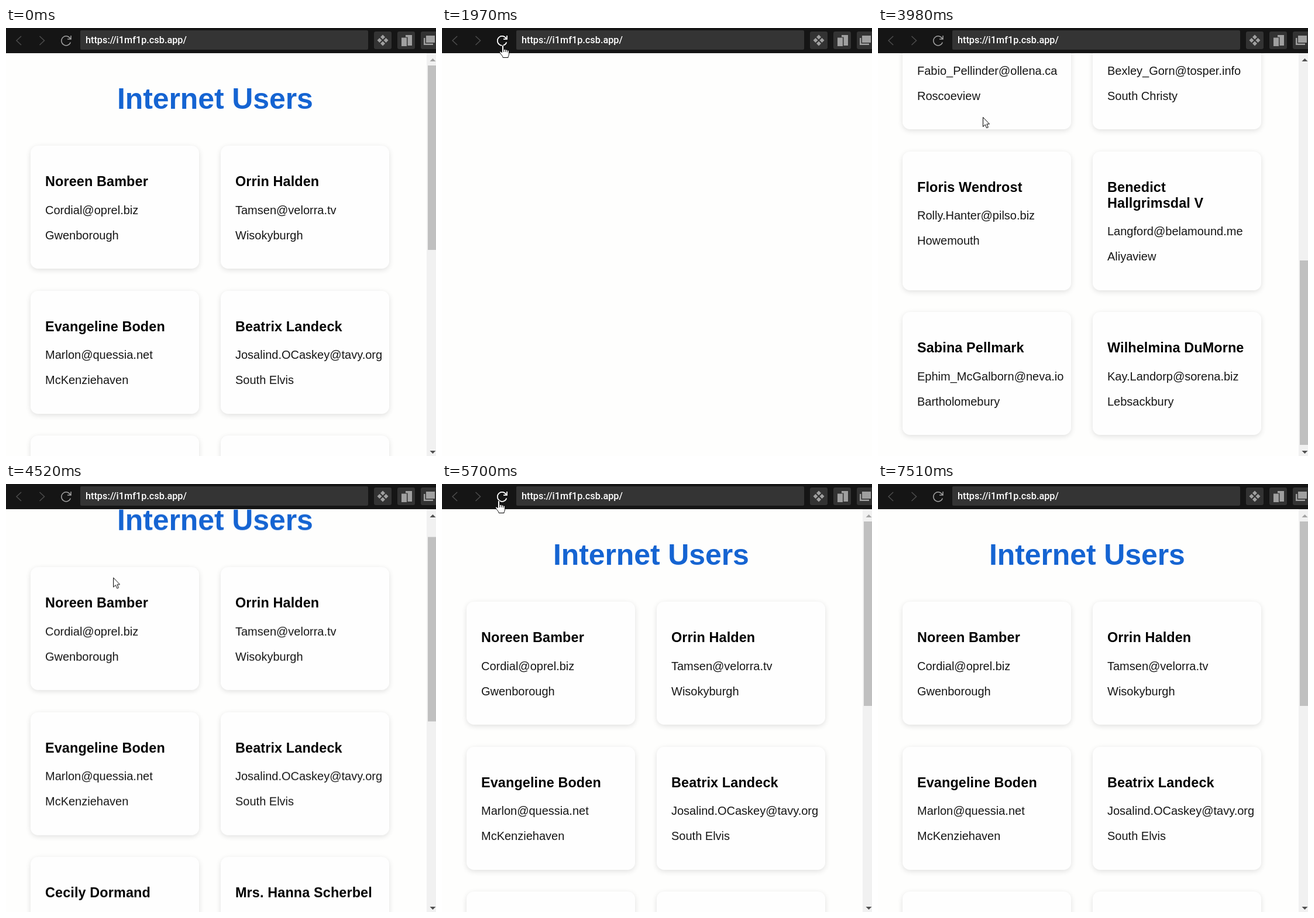
These frames come from a looping animation (735x731 px, 8000 ms). An HTML page:

```html
<!DOCTYPE html>
<html lang="en">
<head>
<meta charset="utf-8">
<title>Internet Users</title>
<style>
  html, body { margin: 0; width: 100%; height: 100%; overflow: hidden; background: #fefefd; }
  #stage { position: relative; width: 735px; height: 731px; overflow: hidden; font-family: "Liberation Sans", Arial, sans-serif; }
  #stage > *, #view > * { position: absolute; }

  /* toolbar */
  #bar { left: 0; top: 0; width: 735px; height: 43px; background: #151515; }
  #bar svg { position: absolute; left: 0; top: 0; }
  #url { position: absolute; left: 127px; top: 4px; width: 483px; height: 33px; padding-left: 9px; background: #343434; border-radius: 2px;
    color: #fff; font: 500 16.25px/33px Roboto, sans-serif; }
  .hot { animation: over 8s step-end infinite; }

  /* page */
  #view { left: 0; top: 43px; width: 735px; height: 688px; overflow: hidden; animation: load 8s step-end infinite; }
  #page { left: 0; top: 0; width: 719px; height: 1421px; animation: scroll 8s linear infinite; }
  h1 { position: absolute; left: 190px; top: 50px; margin: 0; white-space: nowrap; color: #1564d2; font-size: 50px; line-height: 57px; letter-spacing: -.1px; }
  #cards { position: absolute; left: 42px; top: 158px; display: grid; gap: 37.5px;
    grid-template-columns: 287.5px 287.5px; grid-template-rows: repeat(3, 210px) 237px 210px; }
  .card { box-sizing: border-box; padding: 48.4px 0 0 25px; border-radius: 12.5px; background: #fefefe; box-shadow: 0 2.5px 10px rgba(0, 0, 0, .12); white-space: nowrap; color: #000; }
  .card h3 { margin: 0 0 23.4px; font-size: 23.4px; line-height: 27px; letter-spacing: .13px; }
  .card p { margin: 0 0 20px; font-size: 20px; line-height: 23px; color: #161616; }

  /* scrollbar */
  #track { left: 719px; top: 0; width: 16px; height: 688px; background: #f1f1f1; }
  #thumb { left: 721px; top: 21px; width: 14px; height: 315px; background: #c0c0c0; animation: thumb 8s linear infinite; }
  #arrows { left: 719px; top: 0; }
  #up { fill: #a3a3a3; animation: up 8s step-end infinite; }

  /* pointer */
  #pointer { left: 0; top: 0; opacity: 0; overflow: visible; animation: move 8s linear infinite, seen 8s step-end infinite; }
  #pointer .arrow { animation: away 8s step-end infinite; }

  @keyframes load { 0%, 31.2%, 85.6% { opacity: 1 } 24.6%, 74.45% { opacity: 0 } 100% { opacity: 1 } }
  @keyframes over { 0%, 37.85%, 75.3%, 100% { opacity: 0 } 13%, 69.4% { opacity: 1 } }
  @keyframes away { 0%, 37.85%, 75.3%, 100% { opacity: 1 } 13%, 69.4% { opacity: 0 } }
  @keyframes seen { 0%, 93.8%, 100% { opacity: 0 } 2.35% { opacity: 1 } }
  @keyframes up { 0%, 58.95%, 100% { fill: #a3a3a3 } 44.5% { fill: #505050 } }
  @keyframes scroll {
    0%, 43.7% { transform: none; animation-timing-function: cubic-bezier(.35, .2, .35, 1) }
    49.7% { transform: translateY(-733px) }
    53% { transform: translateY(-733px); animation-timing-function: cubic-bezier(.35, .2, .35, 1) }
    58.1% { transform: translateY(-1px); animation-timing-function: step-end }
    58.95%, 100% { transform: none }
  }
  @keyframes thumb {
    0%, 43.7% { transform: none; animation-timing-function: cubic-bezier(.35, .2, .35, 1) }
    49.7% { transform: translateY(333px) }
    53% { transform: translateY(333px); animation-timing-function: cubic-bezier(.35, .2, .35, 1) }
    58.1%, 100% { transform: none }
  }
  @keyframes move {
    0%, 2.375% { transform: translate(576px, 609px); animation-timing-function: cubic-bezier(.3, .3, .5, 1) }
    12% { transform: translate(101px, 37px) }
    13% { transform: translate(100px, 34px) }
    15.6% { transform: translate(96px, 31px) }
    18.8%, 37.2% { transform: translate(104px, 29px); animation-timing-function: ease-in-out }
    41.2%, 43.8% { transform: translate(122px, 97px); animation-timing-function: ease-in-out }
    49.7%, 53% { transform: translate(179px, 152px) }
    58.1%, 60.2% { transform: translate(185px, 163px); animation-timing-function: ease-in-out }
    70.3% { transform: translate(93px, 28px) }
    71.2%, 74.6% { transform: translate(97px, 28px); animation-timing-function: ease-in-out }
    83.8%, 90.6% { transform: translate(277px, 339px); animation-timing-function: ease-in }
    93.8%, 100% { transform: translate(0, 284px) }
  }
</style>
</head>
<body>
<div id="stage">
  <div id="view">
    <div id="page">
      <h1>Internet Users</h1>
      <div id="cards"></div>
    </div>
    <div id="track"></div>
    <div id="thumb"></div>
    <svg id="arrows" width="16" height="688">
      <path id="up" d="M5.5 14 10.5 9 15.5 14Z"/>
      <path d="M5.5 679 15.5 679 10.5 684Z" fill="#505050"/>
    </svg>
  </div>

  <div id="bar">
    <div id="url">https://i1mf1p.csb.app/</div>
    <svg width="735" height="43" fill="none" stroke-width="1.5">
      <path d="M26 14 18 21.5 26 29M57.5 14 65.5 21.5 57.5 29" stroke="#4c4c4c"/>
      <path id="reload" d="M110 18.5A8 8 0 1 0 110.3 24.5M111 13V19H105" stroke="#a0a0a0"/>
      <use class="hot" href="#reload"/>
      <path class="hot" d="M110 18.5A8 8 0 1 0 110.3 24.5M111 13V19H105" stroke="#fff"/>
      <g fill="#333">
        <rect x="629" y="6" width="30" height="30" rx="3"/>
        <rect x="669" y="6" width="30" height="30" rx="3"/>
        <rect x="709" y="6" width="30" height="30" rx="3"/>
      </g>
      <g fill="#a0a0a0">
        <path d="M644 11.5l4 4-4 4-4-4zM644 22.5l4 4-4 4-4-4zM638.5 17l4 4-4 4-4-4zM649.5 17l4 4-4 4-4-4z"/>
        <path d="M683 12H694V30H686.5V15.5H683zM676 16.5H685V31H676z"/>
        <path d="M714 17H716.5V26.5H730V29H714zM718 13H733V25H718z"/>
      </g>
    </svg>
  </div>

  <svg id="pointer" width="24" height="26" stroke="#000" stroke-linejoin="round" fill="#fff">
    <path class="arrow" d="M.5 .5V16.5L4.2 13 6.7 18.7 9.3 17.6 6.9 12H11.5Z"/>
    <path class="hot" d="M-1.7 2C-1.7 0 1.6 0 1.6 2V8.2C2 6.8 4.7 7 4.8 8.6 5.5 7.5 7.7 7.9 7.8 9.4 8.6 8.6 10.5 9.2 10.5 10.7V15.5C10.5 18 9 18.7 9 21.5H.2C0 18.5-3.5 16.5-5.3 12.7-6 11-3.7 10-1.7 12.8ZM1.6 8.2V12M4.8 8.6V12M7.8 9.4V12.5"/>
  </svg>
</div>
<script>
  const users = [
    ["Noreen Bamber", "Cordial@oprel.biz", "Gwenborough"],
    ["Orrin Halden", "Tamsen@velorra.tv", "Wisokyburgh"],
    ["Evangeline Boden", "Marlon@quessia.net", "McKenziehaven"],
    ["Beatrix Landeck", "Josalind.OCaskey@tavy.org", "South Elvis"],
    ["Cecily Dormand", "Fabio_Pellinder@ollena.ca", "Roscoeview"],
    ["Mrs. Hanna Scherbel", "Bexley_Gorn@tosper.info", "South Christy"],
    ["Floris Wendrost", "Rolly.Hanter@pilso.biz", "Howemouth"],
    ["Benedict<br>Hallgrimsdal V", "Langford@belamound.me", "Aliyaview"],
    ["Sabina Pellmark", "Ephim_McGalborn@neva.io", "Bartholomebury"],
    ["Wilhelmina DuMorne", "Kay.Landorp@sorena.biz", "Lebsackbury"]
  ];
  document.getElementById("cards").innerHTML = users.map(([name, mail, city]) =>
    `<div class="card"><h3>${name}</h3><p>${mail}</p><p>${city}</p></div>`).join("");
</script>
</body>
</html>
```
